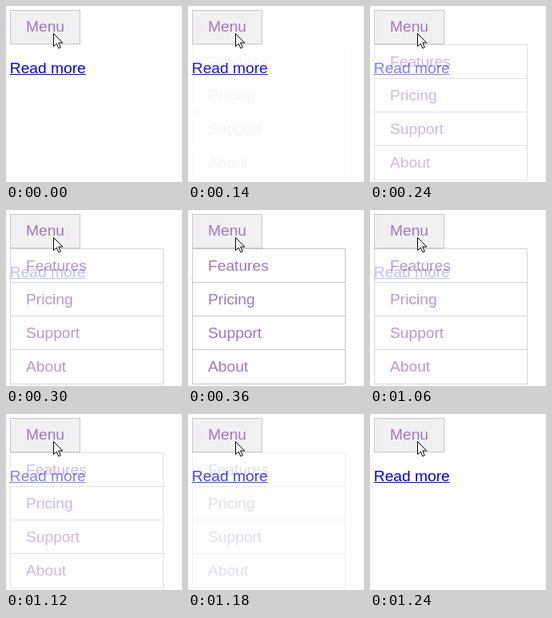
An HTML page for the animation above (1260 ms loop, 220 by 220 pixels).

```html
<!DOCTYPE html>
<html lang="en">
<head>
<meta charset="utf-8">
<title>Menu fade</title>
<style>
  html, body { margin: 0; height: 100%; overflow: hidden; background: #fff; }
  svg { display: block; font: 19.2px "Liberation Sans", Arial, sans-serif; fill: #9f76c0; }
  .box { stroke: #c6c6c8; fill: #fff; }
  #button { fill: #f2f0f3; }
</style>
</head>
<body>
<svg width="220" height="220" viewBox="0 0 220 220">
  <g fill="#0000ee">
    <text x="4.8" y="84">Read more</text>
    <rect x="4.8" y="85" width="95" height="1"/>
  </g>
  <rect id="button" class="box" x="5.5" y="5.5" width="87" height="42"/>
  <text x="25" y="32">Menu</text>
  <g id="menu">
    <rect class="box" x="5.5" y="48.5" width="191" height="169"/>
    <path class="box" d="M6 90.5H196M6 132.5H196M6 174.5H196"/>
    <text x="25" y="75.6">Features</text>
    <text x="25" y="118">Pricing</text>
    <text x="25" y="160">Support</text>
    <text x="25" y="202">About</text>
  </g>
  <circle id="press" cx="60" cy="35" r="12.5" fill="#fff028" fill-opacity=".6"/>
  <path d="M59.5 34.5V50.5L63.2 47L65.8 52.8L68.3 51.7L65.7 46H70.8Z" fill="#fff" stroke="#000"/>
</svg>
<script>
  const LOOP = 1260, STEP = 20, PRESS = 100, FADE = 240;
  const OPEN = 20, CLOSE = 900;
  const menu = document.getElementById('menu');
  const press = document.getElementById('press');

  // Linear fade that begins once the press highlight has gone
  const fade = (t, start) => Math.min(1, Math.max(0, (t - start - PRESS) / FADE));
  const pressed = (t, start) => t >= start && t < start + PRESS;

  function draw(now) {
    const t = Math.floor((now % LOOP) / STEP) * STEP;
    menu.setAttribute('opacity', fade(t, OPEN) - fade(t, CLOSE));
    press.setAttribute('opacity', pressed(t, OPEN) || pressed(t, CLOSE) ? 1 : 0);
  }

  function tick() {
    draw(performance.now());
    requestAnimationFrame(tick);
  }
  tick();
</script>
</body>
</html>
```
